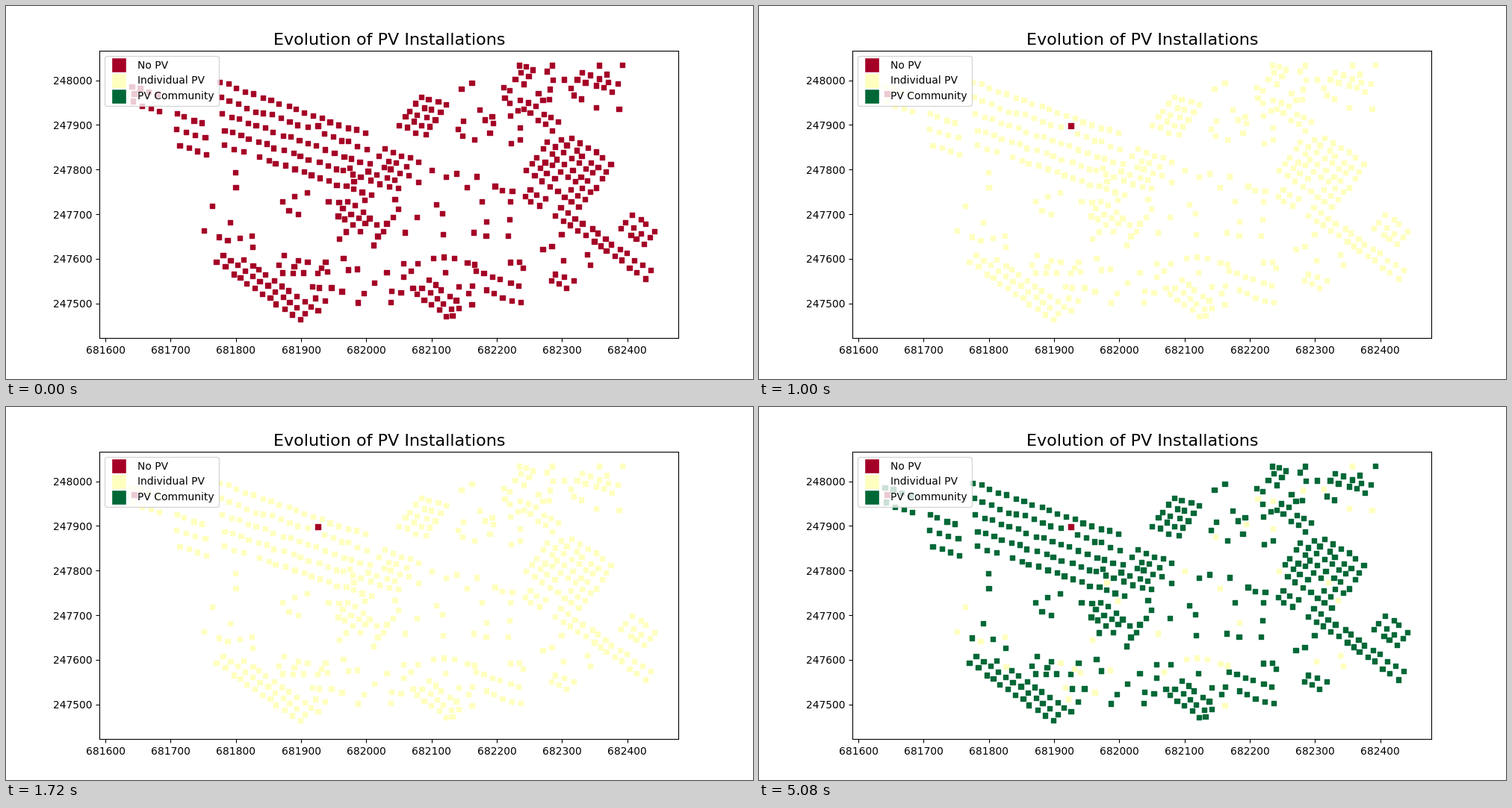
Write a matplotlib script that moves like this. It is 1000 by 500 pixels and loops after 7 s.

```python
import numpy as np
import matplotlib.pyplot as plt
from matplotlib.animation import FuncAnimation
from matplotlib.lines import Line2D

plt.rcParams["font.family"] = "DejaVu Sans"

COLORS = np.array(["#a50026", "#ffffbf", "#006837"])
LABELS = ["No PV", "Individual PV", "PV Community"]
NO_PV, INDIVIDUAL, COMMUNITY = range(3)
XLIM = (681590.64, 682478.44)
YLIM = (247422.8, 248066.2)
INTERVAL = 200
FRAMES = 35

# Street directions, as the step from one house to the next in stage pixels.
GENTLE, STEEP, CLIMB, DROP = np.array([(11.5, 4), (10, 7), (7, -9.5), (2, 21)])

# Each district is a lattice of houses: corner, two directions, houses along each.
DISTRICTS = [
    (168, 107, GENTLE, DROP, 4, 2),
    (228, 144, GENTLE, DROP, 4, 3),
    (285, 102, GENTLE, DROP, 18, 5),
    (478, 230, GENTLE, CLIMB, 5, 5),
    (526, 159, GENTLE, CLIMB, 4, 5),
    (444, 280, STEEP, CLIMB, 4, 3),
    (491, 319, GENTLE, CLIMB, 1, 6),
    (283, 343, STEEP, CLIMB, 12, 2),
    (318, 339, STEEP, CLIMB, 11, 1),
    (471, 397, GENTLE, CLIMB, 1, 4),
    (549, 386, STEEP, CLIMB, 5, 3),
    (597, 414, GENTLE, CLIMB, 1, 5),
    (628, 355, GENTLE, DROP, 6, 2),
    (729, 368, GENTLE, CLIMB, 3, 2),
    (681, 100, GENTLE, CLIMB, 2, 3),
    (764, 98, GENTLE, CLIMB, 5, 2),
    (692, 138, STEEP, CLIMB, 5, 2),
    (697, 220, STEEP, CLIMB, 8, 6),
    (757, 175, STEEP, CLIMB, 6, 1),
    (694, 254, STEEP, CLIMB, 3, 2),
    (735, 279, STEEP, CLIMB, 13, 2),
    (824, 298, STEEP, CLIMB, 4, 3),
]
# Loosely built areas: left, top, right, bottom, number of houses.
OUTSKIRTS = [
    (250, 215, 420, 335, 16),
    (360, 335, 470, 360, 14),
    (395, 375, 450, 400, 6),
    (430, 215, 680, 320, 30),
    (600, 100, 690, 185, 16),
    (665, 78, 830, 150, 22),
    (500, 335, 700, 400, 20),
    (690, 300, 800, 350, 6),
]
WITHOUT = [(171, 117), (417, 160)]
GAP = 8.5

rng = np.random.default_rng(7)


def lattice(x, y, along, across, columns, rows):
    i, j = np.indices((columns, rows)).reshape(2, -1, 1)
    return (x, y) + i * along + j * across + rng.normal(0, 1.1, (columns * rows, 2))


def is_free(point, houses):
    return np.hypot(*(np.array(houses) - point).T).min() > GAP


def settle():
    houses, final = list(WITHOUT), [NO_PV] * len(WITHOUT)

    def build(point, individual_share):
        houses.append(point)
        final.append(INDIVIDUAL if rng.random() < individual_share else COMMUNITY)

    for district in DISTRICTS:
        for point in lattice(*district):
            if is_free(point, houses):
                build(point, 0.03)
    for left, top, right, bottom, count in OUTSKIRTS:
        for _ in range(count):
            spots = rng.uniform((left, top), (right, bottom), (40, 2))
            spot = next((s for s in spots if is_free(s, houses)), None)
            if spot is not None:
                build(spot, 0.35)
    return np.array(houses), np.array(final)


def to_map(points):
    """Convert stage pixels, counted from the top left, to map coordinates."""
    flipped = np.column_stack([points[:, 0] + 0.5, 499.5 - points[:, 1]])
    return ax.transData.inverted().transform(flipped).T


fig, ax = plt.subplots(figsize=(10, 5), dpi=100)
ax.set(xlim=XLIM, ylim=YLIM)
ax.ticklabel_format(useOffset=False, style="plain")
ax.set_title("Evolution of PV Installations", fontsize=16, x=0.501)

houses, final = settle()
homes = ax.scatter(*to_map(houses), s=20, marker="s", zorder=1)
handles = [
    Line2D([0], [0], marker="s", color="w", markerfacecolor=color, markersize=15, label=label)
    for color, label in zip(COLORS, LABELS)
]
ax.legend(handles=handles, loc="upper left")


def update(frame):
    time = frame * INTERVAL
    stage = NO_PV if time < 1000 else INDIVIDUAL if time < 2200 else COMMUNITY
    homes.set_color(COLORS[np.minimum(final, stage)])
    return (homes,)


anim = FuncAnimation(fig, update, frames=FRAMES, interval=INTERVAL, repeat=True, repeat_delay=0)
plt.show()
```
